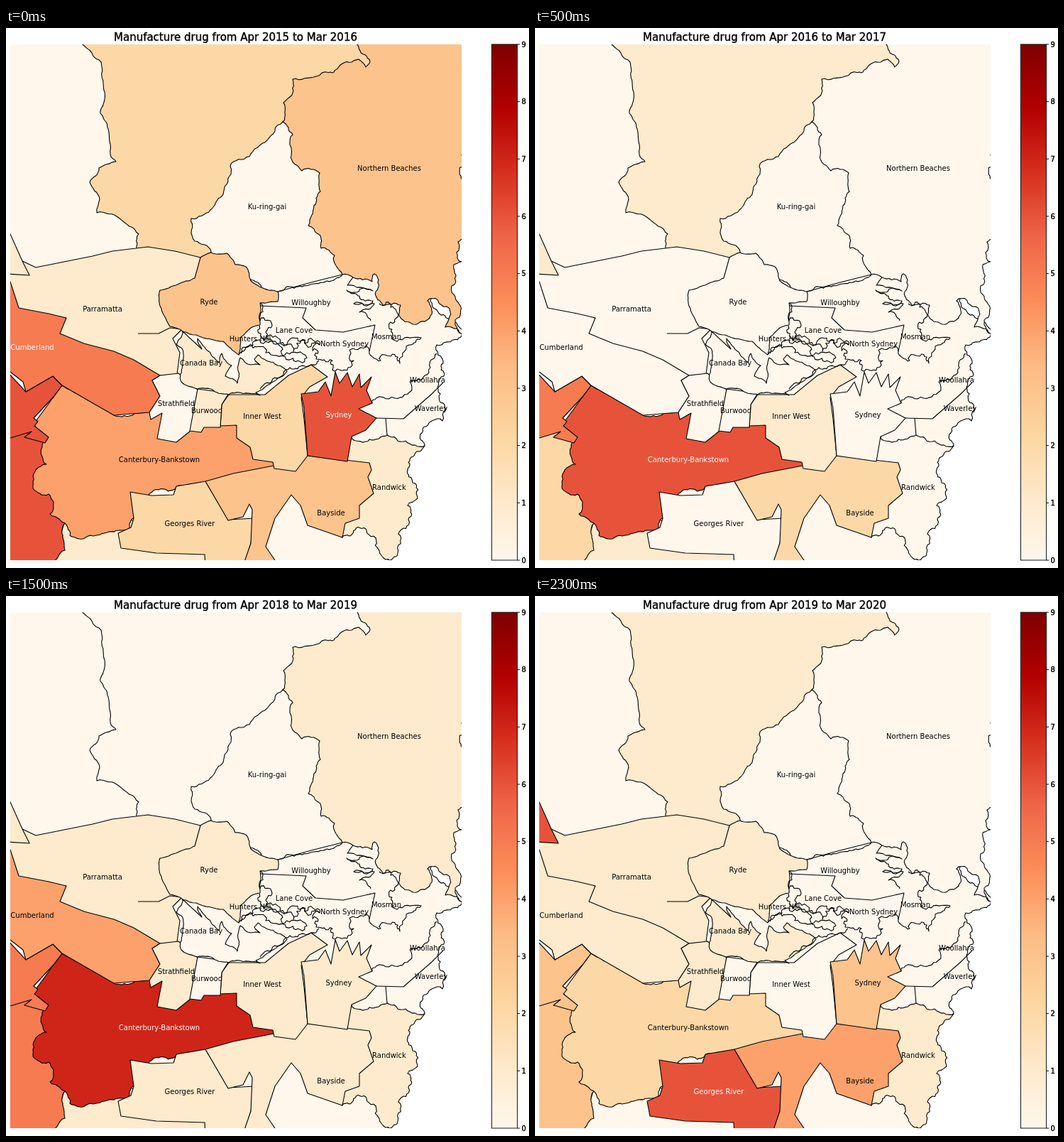
An HTML page for the animation above (2.5 s loop, 737 px wide and 760 px high).

```html
<!DOCTYPE html>
<html lang="en">
<head>
<meta charset="utf-8">
<title>Yearly map</title>
<style>
html, body { margin: 0; width: 100%; height: 100%; overflow: hidden; background: #fff; }
svg { display: block; }
text { font: 10px "DejaVu Sans", sans-serif; text-anchor: middle; }
polygon, polyline { stroke: #000; stroke-width: 1.1; stroke-linejoin: round; fill: none; }
.base { fill: #fff7ec; }
[data-v], .hot { animation: heat 2500ms step-end infinite; }
.title text { font-size: 15px; stroke: #000; stroke-width: .4; visibility: hidden; animation: show 2500ms step-end infinite; }
.ticks text { text-anchor: start; stroke: #000; stroke-width: .4; }
@keyframes heat {
  0% { fill: var(--a); }
  20% { fill: var(--b); }
  40% { fill: var(--c); }
  60% { fill: var(--d); }
  80%, 100% { fill: var(--e); }
}
@keyframes show {
  0% { visibility: visible; }
  20%, 100% { visibility: hidden; }
}
</style>
</head>
<body>
<svg width="737" height="760" viewBox="0 0 737 760">
<defs>
  <linearGradient id="ramp" x1="0" y1="1" x2="0" y2="0"></linearGradient>
</defs>
<g class="title"></g>

<svg x="6" y="23" width="636" height="726" viewBox="6 23 636 726">
  <polygon class="base" data-rough=".2" points="0,0 600,0 600,380 650,431 642,430 607,446 616,472 617,490 612,515 620,537 615,553 600,553 586,570 590,588 545,600 540,770 0,770"/>

  <!-- north -->
  <polygon data-v="21101" points="100,0 520,0 520,60 400,140 290,330 100,330"/>
  <polygon data-v="00100" data-rough=".1" points="0,0 108,0 108,23 134,48 139,100 133,120 144,142 147,178 155,188 131,197 118,217 132,241 128,260 160,268 187,290 186,330 0,345"/>
  <polygon data-v="30010" data-rough=".2" data-name="Northern Beaches" data-at="540 201" points="494,0 497,27 512,44 507,55 497,44 470,53 437,68 404,72 400,97 391,105 390,132 400,320 474,347 489,351 516,357 519,346 521,371 531,391 556,390 556,408 574,417 598,405 594,384 621,392 619,421 642,430 637,386 628,363 631,333 642,329 637,301 650,285 650,0"/>
  <polygon data-v="00000" data-rough=".15" data-name="Ku-ring-gai" data-at="368 255" points="289,316 266,300 261,268 288,256 309,222 316,195 343,181 368,158 390,132 404,150 402,179 417,201 442,204 443,230 434,250 426,278 440,290 444,310 463,320 474,347 383,371 300,330"/>

  <!-- south -->
  <polygon data-v="11010" points="84,690 170,690 290,735 290,770 60,770"/>
  <polygon data-v="62253" data-rough=".15" points="0,560 60,560 84,697 80,717 83,735 67,760 0,760"/>
  <polygon data-v="46772" data-rough=".15" data-name="Canterbury-Bankstown" data-at="216 611" points="79,503 152,545 210,535 330,550 380,618 178,665 180,690 173,707 133,713 112,717 90,714 87,703 62,684 67,667 60,656 38,648 42,622 57,614 51,590 58,578 40,556"/>
  <polygon data-v="65653" points="0,482 28,512 66,490 79,503 67,519 39,549 45,554 40,560 60,576 55,584 26,576 36,568 6,577 0,578"/>
  <polygon data-v="50241" data-name="Cumberland" data-at="37 453" points="0,350 60,395 200,470 217,489 206,496 217,518 202,541 152,545 79,503 66,490 28,512 24,498 6,484 0,482"/>
  <polygon data-v="10311" data-name="Parramatta" data-at="136 399" points="0,330 23,328 42,337 82,329 122,321 150,314 200,308 238,314 274,323 280,400 249,423 235,437 245,457 241,487 217,489 180,467 152,455 110,444 76,430 85,408 60,402 18,394 6,357 0,350"/>
  <polyline points="186,430 215,430 231,422 249,424"/>
  <polygon data-v="11416" points="0,278 6,290 23,328 33,348 0,346"/>
  <polygon data-v="30011" data-rough=".07" data-name="Ryde" data-at="286 389" points="274,323 289,316 311,317 323,333 338,336 345,356 362,366 383,371 383,385 358,387 358,418 345,422 331,435 328,460 306,441 268,432 231,420 217,391 217,369 266,352"/>
  <polygon data-v="10011" data-rough=".2" data-name="Randwick" data-at="540 650" points="487,575 537,573 590,588 574,603 566,622 573,640 580,662 566,672 567,692 553,712 552,739 535,748 508,707 474,717 490,640 478,605"/>
  <polygon data-v="20016" data-name="Georges River" data-at="259 701" points="175,653 205,658 236,657 240,645 281,638 313,692 350,690 345,725 335,760 281,760 280,741 212,739 162,732 158,711 176,703 180,690"/>
  <polygon data-v="32114" data-name="Bayside" data-at="458 686" points="281,638 320,627 377,616 410,600 425,602 512,612 515,622 510,632 518,655 498,672 498,690 478,697 474,717 425,700 415,672 402,657 379,690 366,730 381,752 381,760 333,760 345,725 347,678 343,670 334,688 313,693"/>
  <polygon data-v="21010" data-name="Inner West" data-at="361 550" points="314,516 365,516 398,489 430,474 453,491 428,505 416,520 420,550 425,602 408,624 378,620 376,611 348,607 344,590 325,577 325,559 302,560 304,530"/>
  <polygon data-v="00111" data-name="Strathfield" data-at="240 532" points="217,489 243,486 270,509 260,567 240,583 213,578 220,542 204,551 202,541 217,518 206,496"/>
  <polygon data-v="10000" data-name="Burwood" data-at="283 542" points="270,508 314,514 304,530 302,562 279,562 275,569 259,567"/>
  <polygon data-v="10001" data-rough=".1" data-name="Canada Bay" data-at="275 475" points="249,427 240,445 247,450 246,496 270,508 314,516 358,517 352,513 396,483 355,460 350,466 358,474 345,474 330,464 326,500 309,490 318,475 304,458 300,471 287,456 270,437 276,452"/>
  <polygon data-v="60013" data-name="Sydney" data-at="469 548" points="416,515 440,512 450,498 458,518 464,484 470,500 481,485 488,505 498,487 500,506 515,491 508,510 516,528 497,536 522,549 507,566 487,575 481,610 425,602 420,535"/>

  <!-- harbour side -->
  <polyline points="537,573 535,549"/>
  <polyline points="522,549 560,550 600,515 616,499"/>
  <polyline data-rough=".25" points="516,528 548,521 572,506 570,496 590,489 598,478 607,458"/>
  <polyline points="383,371 430,358 474,347"/>
  <polyline data-rough=".2" points="489,351 481,362 517,370 480,369 517,384 490,388 519,388 498,400 514,412"/>
  <polyline points="358,391 423,394 418,408 436,425 475,428 520,418 512,455"/>
  <polyline data-rough=".35" points="358,387 358,412 375,440 400,438 442,446 405,455 364,440 357,419"/>
  <polyline data-rough=".3" points="328,460 348,447 390,452 424,464 366,457 331,458"/>
  <polyline data-rough=".2" points="358,508 400,478 441,468"/>
  <polyline data-rough=".45" points="442,446 437,466 460,468 470,481 490,468 512,455"/>
  <polyline data-rough=".35" points="512,455 528,468 555,472 568,446 585,436 554,438 550,408 526,388"/>
</svg>

<g class="labels">
  <text x="430" y="390">Willoughby</text>
  <text x="406" y="429">Lane Cove</text>
  <text x="344" y="441">Hunters Hill</text>
  <text x="477" y="448">North Sydney</text>
  <text x="536" y="438">Mosman</text>
  <text x="594" y="499">Woollahra</text>
  <text x="599" y="539">Waverley</text>
</g>

<rect x="684.5" y="23" width="36" height="726" fill="url(#ramp)" stroke="#000" stroke-width=".9"/>
<g class="ticks"></g>
</svg>
<script>
const ramp = ["fff7ec", "fee8c8", "fdd49e", "fdbb84", "fc8d59", "ef6548", "d7301f", "b30000", "7f0000"];
const one = sel => document.querySelector(sel);
const all = sel => document.querySelectorAll(sel);

function add(parent, tag, attrs, text = "") {
  const el = document.createElementNS("http://www.w3.org/2000/svg", tag);
  for (const k in attrs) el.setAttribute(k, attrs[k]);
  el.textContent = text;
  return parent.appendChild(el);
}

// Colour of a count from 0 to 9
function shade(v) {
  const t = v / 9 * 8, i = Math.min(7, Math.floor(t));
  const ch = (hex, k) => parseInt(hex.substr(k * 2, 2), 16);
  const mix = [0, 1, 2].map(k => Math.round(ch(ramp[i], k) + (ch(ramp[i + 1], k) - ch(ramp[i], k)) * (t - i)));
  return `rgb(${mix})`;
}

function setFills(el, counts, colour) {
  [...counts].forEach((v, i) => el.style.setProperty("--" + "abcde"[i], colour(+v)));
}

for (const el of all("[data-v]")) {
  const { v, name, at } = el.dataset;
  setFills(el, v, shade);
  if (!name) continue;
  const [x, y] = at.split(" ");
  setFills(add(one(".labels"), "text", { x, y, class: "hot" }, name), v, n => n > 4 ? "#fff" : "#000");
}

// Ragged line: split each side and push its middle sideways
function ragged([x, y], [u, w], k) {
  const len = Math.hypot(u - x, w - y);
  if (len < 5) return [[x, y]];
  const push = k * Math.min(len, 24) * Math.sin(x * 12.9 + y * 78.2) / len;
  const mid = [(x + u) / 2 - (w - y) * push, (y + w) / 2 + (u - x) * push];
  return [...ragged([x, y], mid, k), ...ragged(mid, [u, w], k)];
}

for (const el of all("[data-rough]")) {
  const pts = el.getAttribute("points").split(" ").map(p => p.split(",").map(Number));
  const out = pts.flatMap((p, i) => pts[i + 1] ? ragged(p, pts[i + 1], +el.dataset.rough) : [p]);
  el.setAttribute("points", out.map(p => p.map(n => n.toFixed(1)).join()).join(" "));
}

for (let i = 0; i < 5; i++) {
  const t = add(one(".title"), "text", { x: 323.5, y: 18 }, `Manufacture drug from Apr ${2015 + i} to Mar ${2016 + i}`);
  t.style.animationDelay = `${i * 500 - (i && 2500)}ms`;
}

ramp.forEach((c, i) => add(one("#ramp"), "stop", { offset: i / 8, "stop-color": "#" + c }));

for (let v = 0; v < 10; v++) {
  const y = 749 - v * 726 / 9;
  add(one(".ticks"), "path", { d: `M720.5 ${y}h3.5`, stroke: "#000" });
  add(one(".ticks"), "text", { x: 726.5, y: y + 3.7 }, v);
}
</script>
</body>
</html>
```
